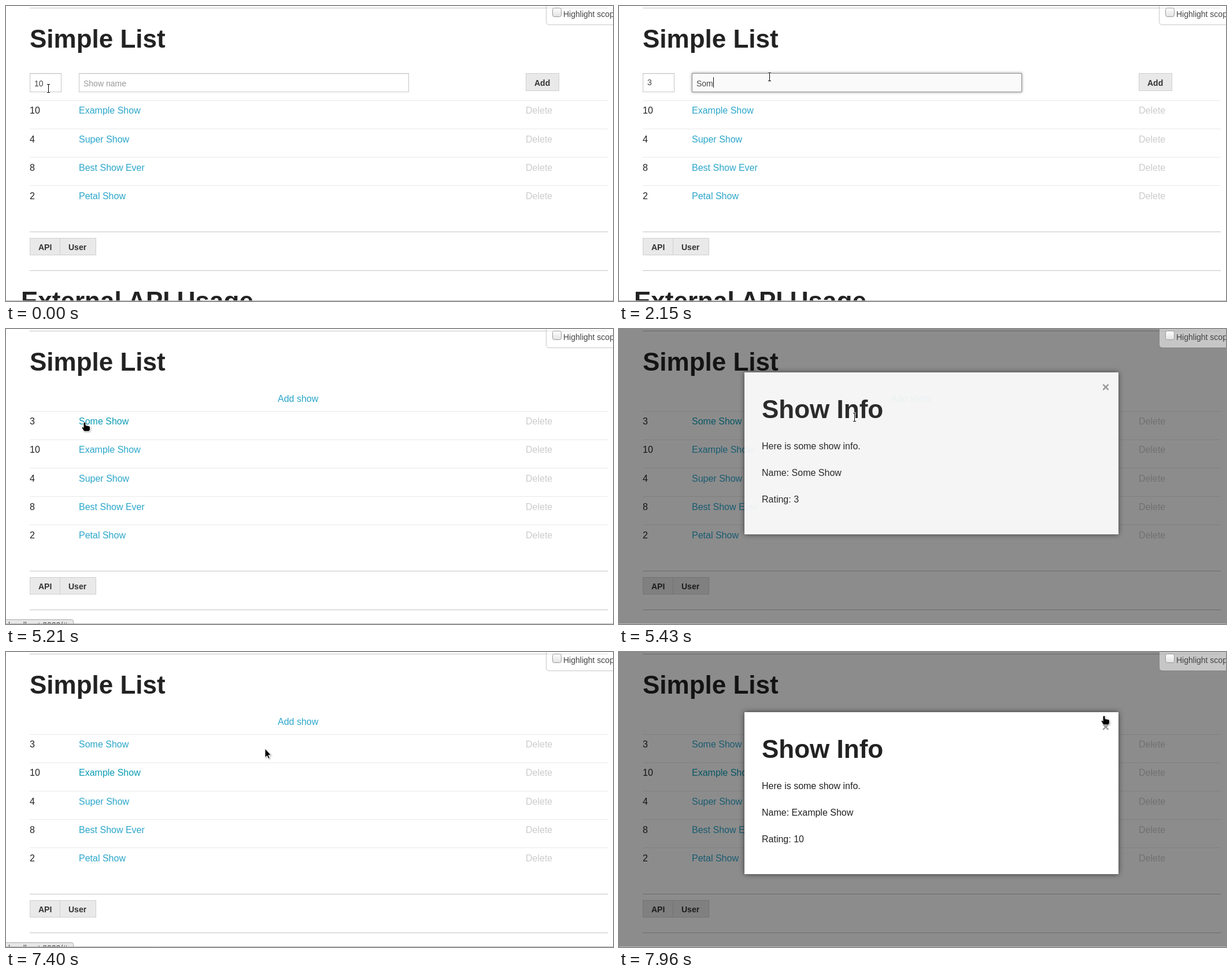
An HTML page that plays this animation: 1050 px wide and 510 px high, repeating every 8000 ms.

```html
<!DOCTYPE html>
<html lang="en">
<head>
<meta charset="utf-8">
<title>Simple List</title>
<style>
html, body { margin: 0; width: 100%; height: 100%; overflow: hidden; background: #fff; }
svg { display: block; }
text, .typed { font: 16px "Liberation Sans", Arial, sans-serif; fill: #222; white-space: pre; }
.h1 { font-weight: bold; font-size: 44px; }
.small { font-size: 14px; fill: #444; }
.hint { fill: #999; }
.link { fill: #2ba6cb; }
.off { fill: #ccc; }
.label { font-weight: bold; font-size: 14px; fill: #333; }
.close { font-weight: bold; font-size: 22px; fill: #999; text-anchor: middle; }
.hr { stroke: #c4c4c4; }
.line { stroke: #e9e9e9; }
.button { fill: #e9e9e9; stroke: #d0d0d0; }
.field { fill: #fff; stroke: #c6c6c6; }
.inset { stroke: #ededed; }
.edge { fill: none; stroke: #909090; }
.glow { fill: #fafafa; filter: drop-shadow(0 0 2.5px #999); }

/* 1% = 80 ms. Hard switches step, movement eases. */
.step { animation: 8s step-end infinite; }
.move { animation: 8s linear infinite; }

.form { animation-name: form; }
.added { animation-name: added; }
.new-row { animation-name: new-row; }
.rest { animation-name: shift; }
.rating-a { animation-name: rating-a; }
.rating-b { animation-name: rating-b; }
.hint { animation-name: hint; }
.focus-rating { animation-name: focus-rating; }
.focus-name { animation-name: focus-name; }
.edge-name { animation-name: edge-name; }
.press { animation-name: press; }
.ring { animation-name: ring; }
.link-some { animation-name: link-some; }
.link-example { animation-name: link-example; }
.status { animation-name: status; }
.dim { animation-name: dim; }
.modal { animation-name: modal; }
.info-a { animation-name: info-a; }
.info-b { animation-name: info-b; }
.pointer { animation-name: path; }
.beam { animation-name: beam; }
.arrow { animation-name: arrow; }
.hand { animation-name: hand; }

.typed { font-size: 14px; line-height: 16px; color: #444; padding-top: 6px; }
.typed::before { content: ""; animation: type 8s step-end infinite; }
.typed::after {
  content: ""; position: absolute; width: 1px; height: 18px; margin-top: -3px;
  background: #111; animation: caret 8s step-end infinite;
}

@keyframes form { 54.25% { visibility: hidden } to { visibility: hidden } }
@keyframes added { from { visibility: hidden } 54.25%, to { visibility: visible } }
@keyframes new-row { from { visibility: hidden } 55.125%, to { visibility: visible } }
@keyframes shift { from { transform: none } 54.25%, to { transform: translateY(28px) } }
@keyframes rating-a { from { opacity: 1 } 7.75%, to { opacity: 0 } }
@keyframes rating-b { from { opacity: 0 } 7.75%, to { opacity: 1 } }
@keyframes hint { from { opacity: 1 } 22.75%, to { opacity: 0 } }
@keyframes type {
  from { content: "" }
  22.75% { content: "S" }
  25.375% { content: "So" }
  26.875% { content: "Som" }
  28.125% { content: "Some" }
  29.5% { content: "Some " }
  33.75% { content: "Some S" }
  34.875% { content: "Some Sh" }
  36% { content: "Some Sho" }
  37.125%, to { content: "Some Show" }
}
@keyframes caret { from { opacity: 0 } 11.125% { opacity: 1 } 51%, to { opacity: 0 } }
@keyframes focus-rating {
  0%, 1.2% { opacity: 0 }
  6.8%, 11.125% { opacity: 1 }
  16.625%, to { opacity: 0 }
}
@keyframes focus-name {
  0%, 11.125% { opacity: 0 }
  16.625%, 51% { opacity: 1 }
  52.6%, to { opacity: 0 }
}
@keyframes edge-name { 0%, 11.125% { opacity: 0 } 16.625%, to { opacity: 1 } }
@keyframes press { from { opacity: 0 } 50.75%, to { opacity: 1 } }
@keyframes ring { from { opacity: 0 } 51.75%, to { opacity: 1 } }
@keyframes link-some { from { fill: #2ba6cb } 63.5% { fill: #0a9cb4 } 81.375%, to { fill: #2ba6cb } }
@keyframes link-example { from { fill: #2ba6cb } 89%, to { fill: #0a9cb4 } }
@keyframes status {
  from { visibility: hidden }
  63.5% { visibility: visible }
  66.86% { visibility: hidden }
  89% { visibility: visible }
  95%, to { visibility: hidden }
}
@keyframes dim {
  0%, 66% { opacity: 0 }
  66.7%, 85.125% { opacity: .45 }
  86.375%, 93.25% { opacity: 0 }
  93.5%, to { opacity: .45 }
}
@keyframes modal {
  0%, 66.86% { transform: translateY(-341px); opacity: 0; animation-timing-function: ease-in }
  67.875%, 68.7% { transform: translateY(-29px); opacity: .915 }
  68.75%, 83.875% { transform: none; opacity: 1 }
  84.5%, 93.5% { transform: translateY(-341px); opacity: 0; animation-timing-function: ease-in }
  94.375% { transform: translateY(-71px); opacity: .79; animation-timing-function: ease-out }
  95.2%, to { transform: none; opacity: 1 }
}
@keyframes info-a { from { opacity: 1 } 90%, to { opacity: 0 } }
@keyframes info-b { from { opacity: 0 } 90%, to { opacity: 1 } }
@keyframes path {
  0%, .75% { transform: translate(73px, 142px) }
  2.875% { transform: translate(30px, 146px) }
  4.75% { transform: translate(4px, 144px) }
  7% { transform: translate(60px, 140px) }
  10.25%, 42.125% { transform: translate(260px, 122px) }
  42.625%, 45% { transform: translate(277px, 123px); animation-timing-function: ease-in }
  48.125% { transform: translate(520px, 92px) }
  51% { transform: translate(900px, 118px) }
  52%, 55.125% { transform: translate(918px, 121px) }
  58.25% { transform: translate(500px, 150px) }
  61.75% { transform: translate(140px, 163px) }
  63.5%, 66% { transform: translate(136px, 162px) }
  67.875%, 68.7% { transform: translate(407px, 152px) }
  70.5% { transform: translate(640px, 120px) }
  73.375% { transform: translate(804px, 100px) }
  76% { transform: translate(848px, 128px) }
  79.375%, 83.875% { transform: translate(842px, 127px) }
  87% { transform: translate(500px, 170px) }
  89.75%, 90.75% { transform: translate(190px, 206px) }
  92.5%, 93.4% { transform: translate(448px, 167px) }
  95.25% { transform: translate(720px, 130px) }
  98.75%, to { transform: translate(839px, 111px) }
}
@keyframes beam {
  from { visibility: visible }
  45.5% { visibility: hidden }
  67.25% { visibility: visible }
  69.5%, to { visibility: hidden }
}
@keyframes arrow {
  from { visibility: hidden }
  45.5% { visibility: visible }
  50.75% { visibility: hidden }
  55.25% { visibility: visible }
  62% { visibility: hidden }
  66.25% { visibility: visible }
  67.25% { visibility: hidden }
  69.5% { visibility: visible }
  75.5% { visibility: hidden }
  84.25% { visibility: visible }
  89% { visibility: hidden }
  91.25% { visibility: visible }
  98.25%, to { visibility: hidden }
}
@keyframes hand {
  from { visibility: hidden }
  50.75% { visibility: visible }
  55.25% { visibility: hidden }
  62% { visibility: visible }
  66.25% { visibility: hidden }
  75.5% { visibility: visible }
  84.25% { visibility: hidden }
  89% { visibility: visible }
  91.25% { visibility: hidden }
  98.25%, to { visibility: visible }
}
</style>
</head>
<body>
<svg width="1050" height="510" viewBox="0 0 1050 510">
  <defs>
    <linearGradient id="box" x2="0" y2="1">
      <stop stop-color="#fff"/><stop offset="1" stop-color="#e2e2e2"/>
    </linearGradient>
  </defs>

  <path class="hr" d="M41 3.5H1041"/>
  <text class="h1" x="41" y="72">Simple List</text>

  <g class="form step">
    <rect class="field" x="41.5" y="116.5" width="54" height="32"/>
    <path class="inset" d="M42 117.5H95"/>
    <g class="focus-rating move">
      <rect class="glow" x="41" y="116" width="55" height="33"/>
      <rect class="edge" x="41.5" y="116.5" width="54" height="32"/>
    </g>
    <text class="small rating-a step" x="49" y="139">10</text>
    <text class="small rating-b step" x="49" y="137">3</text>

    <rect class="field" x="126.5" y="116.5" width="570" height="32"/>
    <path class="inset" d="M127 117.5H696"/>
    <rect class="glow focus-name move" x="126" y="116" width="571" height="33"/>
    <rect class="edge edge-name move" x="126.5" y="116.5" width="570" height="32"/>
    <text class="small hint step" x="134" y="139">Show name</text>
    <foreignObject x="134" y="120" width="300" height="27"><div class="typed"></div></foreignObject>

    <rect class="button" x="899.5" y="116.5" width="57" height="30"/>
    <g class="press step">
      <rect x="899" y="116" width="58" height="31" fill="#d4d4d4"/>
      <path d="M899 116.5H957" stroke="#b4b4b4"/>
    </g>
    <text class="label" x="914" y="138">Add</text>
    <rect class="ring step" x="912.5" y="126.5" width="30" height="12" fill="none" stroke="#333" stroke-dasharray="1"/>
  </g>

  <g class="added step">
    <text class="link" x="470" y="126">Add show</text>
    <path class="line" d="M41 142.5H1041"/>
  </g>
  <g class="new-row step">
    <text x="41" y="165">3</text>
    <text class="link link-some step" x="126" y="165">Some Show</text>
    <text class="off" x="899" y="165">Delete</text>
  </g>

  <g class="rest step">
    <path class="line" d="M41 163.5H1041M41 212.5H1041M41 261.5H1041M41 310.5H1041"/>
    <text x="41" y="186">10</text>
    <text class="link link-example step" x="126" y="186">Example Show</text>
    <text class="off" x="899" y="186">Delete</text>
    <text x="41" y="236">4</text>
    <text class="link" x="126" y="236">Super Show</text>
    <text class="off" x="899" y="236">Delete</text>
    <text x="41" y="285">8</text>
    <text class="link" x="126" y="285">Best Show Ever</text>
    <text class="off" x="899" y="285">Delete</text>
    <text x="41" y="334">2</text>
    <text class="link" x="126" y="334">Petal Show</text>
    <text class="off" x="899" y="334">Delete</text>

    <path class="hr" d="M41 390.5H1041M41 457.5H1041"/>
    <rect class="button" x="41.5" y="401.5" width="52" height="29"/>
    <rect class="button" x="93.5" y="401.5" width="62" height="29"/>
    <text class="label" x="56" y="422">API</text>
    <text class="label" x="108" y="422">User</text>
    <text class="h1" x="26" y="525">External API Usage</text>
  </g>

  <rect class="dim move" width="1050" height="510"/>

  <rect x="934.5" y="-9.5" width="140" height="42" rx="5" fill="#fff" fill-opacity=".5" stroke="#000" stroke-opacity=".22"/>
  <rect x="945.5" y="3.5" width="15" height="15" rx="3" fill="url(#box)" stroke="#999"/>
  <text class="small" x="964" y="19">Highlight scopes</text>

  <g class="modal move">
    <rect x="217" y="104" width="647" height="280" fill="#fff" style="filter:drop-shadow(0 0 5px rgba(0,0,0,.6))"/>
    <text class="h1" x="247" y="183">Show Info</text>
    <text class="close" x="842" y="137">×</text>
    <text x="247" y="237">Here is some show info.</text>
    <g class="info-a step">
      <text x="247" y="283">Name: Some Show</text>
      <text x="247" y="329">Rating: 3</text>
    </g>
    <g class="info-b step">
      <text x="247" y="283">Name: Example Show</text>
      <text x="247" y="329">Rating: 10</text>
    </g>
  </g>

  <g class="status step">
    <rect x="-5.5" y="502.5" width="122" height="20" rx="3" fill="#e8e8e8" stroke="#aaa"/>
    <text class="small" x="4" y="517">localhost:2022/#</text>
  </g>
  <path d="M0 509.5H1050" stroke="#b8b8b8"/>

  <g class="pointer move">
    <g class="beam step" fill="none">
      <path d="M-2 -6.5H3M.5 -6.5V7.5M-2 7.5H3" stroke="#fff" stroke-width="3"/>
      <path d="M-2 -6.5H3M.5 -6.5V7.5M-2 7.5H3" stroke="#000"/>
    </g>
    <path class="arrow step" d="M0 0V15.5L3.5 12.4L6 17.5L8.4 16.5L6 11.4H10.7Z" stroke="#fff" style="filter:drop-shadow(1px 1px 1px rgba(0,0,0,.3))"/>
    <g class="hand step" stroke="#fff" style="filter:drop-shadow(1px 1px 1px rgba(0,0,0,.3))">
      <path d="M-2 1Q-2 -1 0 -1Q2 -1 2 1V4.5L7.5 5.5Q9.5 6 9.5 8V11.5L8 15H-1L-4.5 9.5Q-5.5 7 -3.5 7L-2 8.5Z"/>
    </g>
  </g>
</svg>
</body>
</html>
```
